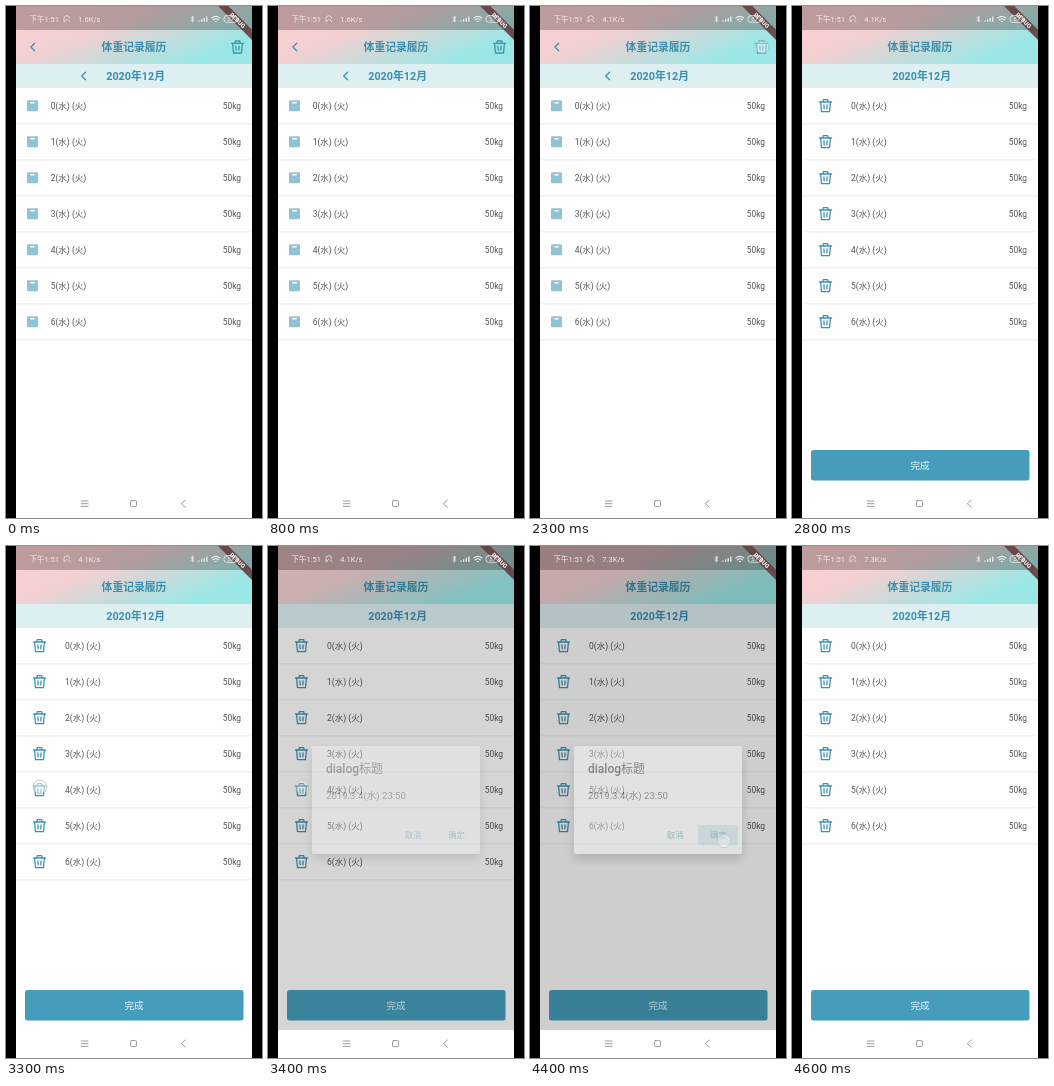
An HTML page for the animation above (8 s loop, 256x512 px).

```html
<!DOCTYPE html>
<html lang="zh-CN">
<head>
<meta charset="utf-8">
<style>
html, body { margin: 0; width: 100%; height: 100%; overflow: hidden; background: #000; }
svg { display: block; width: 256px; height: 512px; }
text { font-family: Roboto, "Noto Sans CJK SC", "Noto Sans CJK JP", sans-serif; white-space: pre; }
.line { fill: none; stroke-linecap: round; stroke-linejoin: round; }
.teal { stroke: #3c94b2; stroke-width: 1.3; }
.row { font-size: 8.5px; fill: #555; }
.head { font-size: 10.8px; font-weight: 700; fill: #3a8fae; text-anchor: middle; }
.status { font-size: 7.5px; fill: #f1ecec; }
.nav { stroke: #858585; stroke-width: .8; }
.action { font-size: 8.4px; fill: #459dbb; text-anchor: middle; }
</style>
</head>
<body>
<svg viewBox="0 0 256 512">
  <defs>
    <linearGradient id="sky" gradientUnits="userSpaceOnUse" x1="101" y1="-37" x2="155" y2="95">
      <stop offset=".1" stop-color="#fccfd0"/>
      <stop offset=".38" stop-color="#f0d0d2"/>
      <stop offset=".82" stop-color="#9be7e5"/>
    </linearGradient>
    <filter id="shade" x="-20%" y="-20%" width="140%" height="150%">
      <feDropShadow dx="0" dy="5" stdDeviation="5" flood-opacity=".35"/>
    </filter>
    <clipPath id="phone"><path d="M10 0H246V512H10Z"/></clipPath>
    <g id="bin" class="line teal">
      <path d="M-6-3.7H6M-2.7-3.7L-2.2-6H2.2L2.7-3.7M-4.9-3.5L-4 6H4L4.9-3.5"/>
      <path d="M-1.6-.8L-1.3 3.2M1.6-.8L1.3 3.2"/>
    </g>
    <g id="scale">
      <rect x="-5.5" y="-5.5" width="11" height="11" rx="1" fill="#90c3d5"/>
      <path d="M-2.6-3.8H2.6L1.8-2.2H-1.8Z" fill="#fff"/>
    </g>
  </defs>
  <rect width="256" height="512"/>
  <g clip-path="url(#phone)">
    <rect x="10" width="236" height="512" fill="#fefefe"/>
    <rect x="10" width="236" height="58" fill="url(#sky)"/>
    <rect x="10" width="236" height="24" opacity=".25"/>
    <rect x="10" y="58" width="236" height="24" fill="#deeff2"/>
    <text class="head" x="128" y="45.2">体重记录履历</text>
    <text class="head" x="129.6" y="74">2020年12月</text>
    <g id="view">
      <path class="line teal" d="M28.7 37.2L24.9 41L28.7 44.8M79.5 66.2L75.7 70L79.5 73.8"/>
      <use href="#bin" x="231.5" y="41"/>
    </g>
    <g id="rows"></g>
    <g id="done">
      <rect x="19" y="444" width="218.5" height="30.5" rx="2.5" fill="#459dbb"/>
      <text x="128" y="463.2" font-size="9.6" fill="#e9f5f8" text-anchor="middle">完成</text>
    </g>
    <rect id="dim" x="10" width="236" height="484"/>
    <g id="dialog">
      <rect x="44" y="200" width="168" height="108" rx="2" fill="#fff" filter="url(#shade)"/>
      <text x="58" y="226.7" font-size="12" font-weight="500" fill="#222">dialog标题</text>
      <text x="58" y="252.6" font-size="9.6" fill="#333">2019.3.4(水) 23:50</text>
      <rect id="press" x="168" y="279" width="40" height="20" rx="1.5" fill="#459dbb" opacity=".3"/>
      <text class="action" x="145" y="292">取消</text>
      <text class="action" x="188.5" y="292">确定</text>
    </g>
    <rect x="10" y="484" width="236" height="28" fill="#fefefe"/>
    <g class="line nav">
      <path d="M75.3 495H82M75.3 497.7H82M75.3 500.4H82M179.3 494.2L175.3 497.7L179.3 501.2"/>
      <rect x="124.5" y="494.6" width="6" height="6" rx="1"/>
    </g>
    <g transform="translate(246 0) rotate(45)">
      <rect x="-26" y="16.8" width="52" height="7.2" fill="#674143" opacity=".92"/>
      <text y="22.5" font-size="6" font-weight="900" fill="#eee" text-anchor="middle">DEBUG</text>
    </g>
    <g class="status">
      <text x="23.5" y="15.9">下午1:51</text>
      <text id="speed" x="72.3" y="15.9"></text>
      <g class="line" stroke="#f1ecec" stroke-width=".8">
        <path d="M58 15.5V12.5A2.8 2.8 0 0 1 63.6 12.5M58.5 15.8L60.3 13.6M62 13.6L64 16"/>
        <path d="M184.8 11.3L188 14.5L186.4 16V10L188 11.5L184.8 14.7"/>
        <path d="M193 15.8V14.6M195.6 15.8V13.3M198.2 15.8V12M200.8 15.8V10.4" stroke-width="1.3" stroke-linecap="butt"/>
        <path d="M205.8 12Q209.8 8.8 213.8 12M207.3 13.8Q209.8 11.8 212.3 13.8M209.3 15.5H210.3" stroke-width="1.1"/>
        <rect x="218" y="9.7" width="13" height="6.6" rx="2.5"/>
        <path d="M232.4 12V14"/>
      </g>
      <text x="224.5" y="15.2" font-size="6" text-anchor="middle" style="font-size:6px">57</text>
    </g>
    <circle id="touch" r="6.8" fill="#fff" fill-opacity=".55" stroke="#a9bcc3" stroke-width=".9"/>
  </g>
</svg>
<script>
const $ = id => document.getElementById(id);
const LOOP = 8000;

// [start ms, dim, dialog opacity, touch x, touch y, touch opacity]
const steps = [
  [0, 0, 0, 232, 41, 0],
  [2200, 0, 0, 232, 41, .45],
  [2300, 0, 0, 232, 41, .75],
  [2400, 0, 0, 34, 241, 0],
  [3300, 0, 0, 34, 241, .9],
  [3400, .16, .3, 34, 241, .5],
  [3500, .43, .85, 194, 295, 0],
  [3600, .54, 1, 194, 295, 0],
  [4300, .54, 1, 194, 295, .9],
  [4400, .19, .42, 194, 295, .6],
  [4500, .04, .08, 194, 295, 0],
  [4600, 0, 0, 194, 295, 0]
];
const speeds = [[0, '1.6K/s'], [1400, '4.1K/s'], [4400, '7.3K/s']];

const rows = Array.from({ length: 7 }, (_, i) => {
  const g = document.createElementNS('http://www.w3.org/2000/svg', 'g');
  g.innerHTML = `<use/><text class="row" y="103.1">${i}(水) (火)</text>
    <text class="row" x="235" y="103.1" text-anchor="end" style="font-size:8.4px">50kg</text>
    <path d="M10 117.8H246" stroke="#e4e8e9" stroke-width=".8"/>`;
  return $('rows').appendChild(g);
});

const at = (table, t) => table.findLast(s => s[0] <= t);
const show = (el, on) => { el.style.display = on ? '' : 'none'; };

function render(t) {
  const [, dim, dialog, x, y, touch] = at(steps, t);
  const edit = t >= 2400;
  const removed = t >= 4400;

  $('speed').textContent = at(speeds, t)[1];
  show($('view'), !edit);
  show($('done'), edit);
  rows.forEach((g, i) => {
    const slot = removed && i > 4 ? i - 1 : i;
    const [icon, label] = g.children;
    show(g, !(removed && i === 4));
    g.setAttribute('transform', `translate(0 ${slot * 36})`);
    icon.setAttribute('href', edit ? '#bin' : '#scale');
    icon.setAttribute('x', edit ? 33.5 : 26.5);
    icon.setAttribute('y', 99.7);
    label.setAttribute('x', edit ? 59 : 44.7);
  });
  $('dim').style.opacity = dim;
  $('dialog').style.opacity = dialog;
  show($('press'), removed);
  $('touch').setAttribute('cx', x);
  $('touch').setAttribute('cy', y);
  $('touch').style.opacity = touch;
}

const start = performance.now();
function tick() {
  render((performance.now() - start) % LOOP);
  requestAnimationFrame(tick);
}
tick();
</script>
</body>
</html>
```
